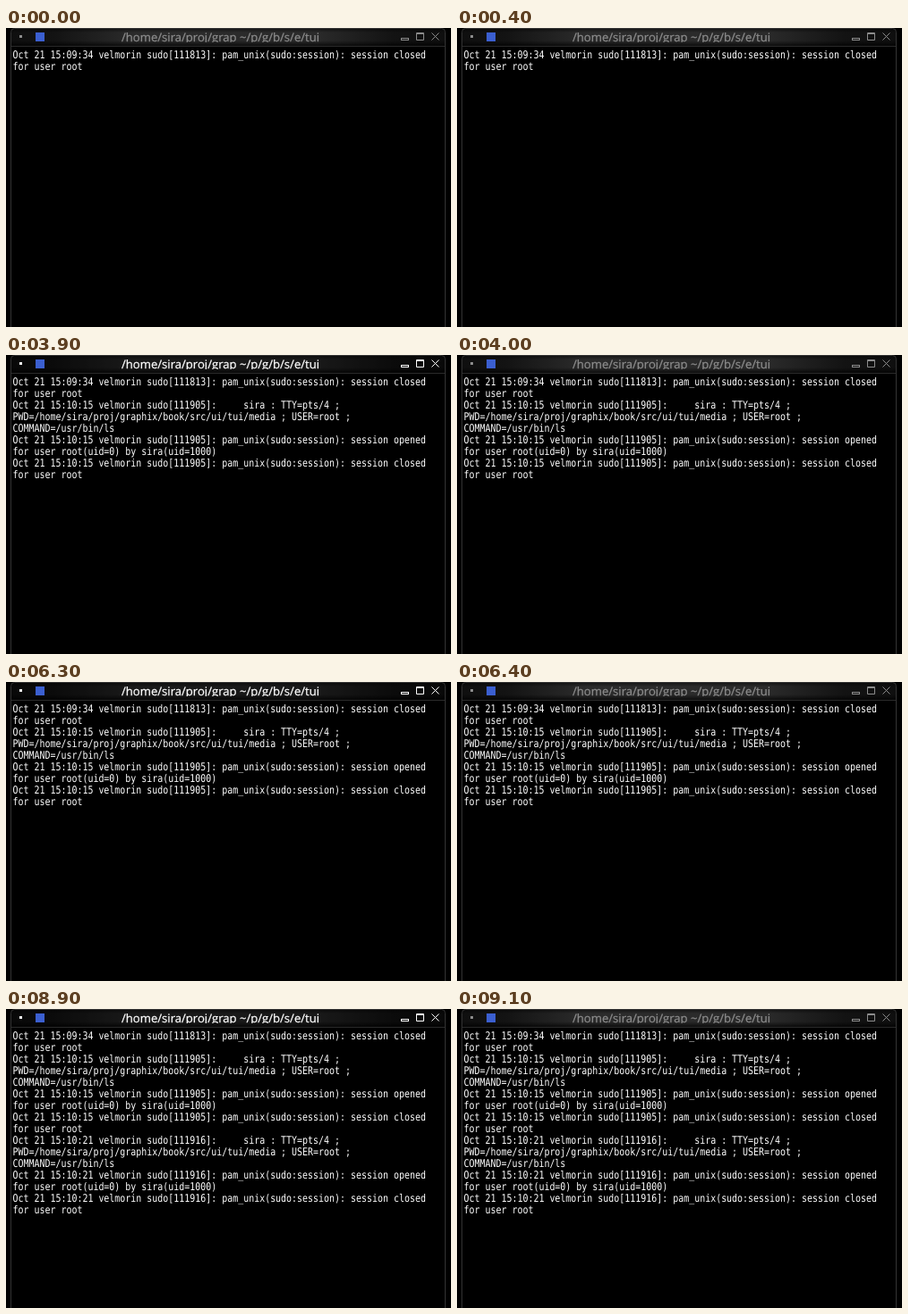
An HTML page that plays this animation: 497 by 335 pixels, repeating every 10 s.

```html
<!DOCTYPE html>
<html lang="en">
<head>
<meta charset="utf-8">
<title>Session log</title>
<style>
  html, body { margin: 0; width: 100%; height: 100%; overflow: hidden; background: #000; }
  svg { display: block; }
  text { white-space: pre; text-rendering: geometricPrecision; }
  .log text { font: 9.966px "DejaVu Sans Mono", "Noto Sans Mono", monospace; fill: #fff; }
  .title {
    font: 13.1px "Open Sans", "Noto Sans", sans-serif;
    fill: currentColor; stroke: currentColor; stroke-width: .25px;
  }
  .bar { color: #8c8c8c; animation: focus 10s step-end infinite; }
  .glow { animation: glow 10s step-end infinite; }
  .late { visibility: hidden; animation: second 10s step-end infinite; }
  .late.last { animation-name: third; }

  @keyframes focus {
    0%, 4%, 40%, 64%, 91%, 100% { color: #8c8c8c; }
    2%, 39%, 63%, 89% { color: #fff; }
  }
  @keyframes glow {
    0%, 4%, 40%, 64%, 91%, 100% { opacity: 1; }
    2%, 39%, 63%, 89% { opacity: .6; }
  }
  @keyframes second { 0% { visibility: hidden; } 21%, 100% { visibility: visible; } }
  @keyframes third { 0% { visibility: hidden; } 83%, 100% { visibility: visible; } }
</style>
</head>
<body>
<svg width="497" height="335" viewBox="0 0 497 335">
  <defs>
    <linearGradient id="sheen">
      <stop offset="0" stop-color="#0f0f0f"/>
      <stop offset=".1" stop-color="#131313"/>
      <stop offset=".28" stop-color="#2b2b2b"/>
      <stop offset=".7" stop-color="#2b2b2b"/>
      <stop offset=".88" stop-color="#131313"/>
      <stop offset="1" stop-color="#0f0f0f"/>
    </linearGradient>
    <linearGradient id="shade" x2="0" y2="1">
      <stop offset="0" stop-opacity=".6"/>
      <stop offset=".25" stop-opacity="0"/>
      <stop offset=".7" stop-opacity="0"/>
      <stop offset="1" stop-opacity=".7"/>
    </linearGradient>
    <clipPath id="strip"><rect x="60" width="370" height="16"/></clipPath>
  </defs>

  <g class="bar">
    <g class="glow">
      <path d="M6 20V4q0-4 4-4H486q4 0 4 4V20z" fill="url(#sheen)"/>
      <path d="M6 20V4q0-4 4-4H486q4 0 4 4V20z" fill="url(#shade)"/>
    </g>
    <rect x="15" y="8" width="3" height="3" fill="currentColor"/>
    <rect x="33" y="5" width="10" height="10" fill="#3b5fd0"/>
    <g clip-path="url(#strip)">
      <text class="title" x="129" y="15">/home/sira/proj/grap ~/p/g/b/s/e/tui</text>
    </g>
    <g fill="none" stroke="currentColor">
      <rect x="441.5" y="11.5" width="8" height="2"/>
      <path d="M458.5 5.5h8v8h-8zM458 6.5h9"/>
      <path d="M475.5 5.5l8 8m0-8l-8 8"/>
    </g>
  </g>

  <path d="M5.5 335V4.5q0-4 4-4H486.5q4 0 4 4V335" fill="none" stroke="#333"/>
  <path d="M6 20.5H490" stroke="#2a2a2a"/>

  <g class="log"></g>
</svg>
<script>
  const NS = "http://www.w3.org/2000/svg";
  const log = document.querySelector(".log");
  const add = (parent, tag, attrs) => {
    const el = document.createElementNS(NS, tag);
    for (const key in attrs) el.setAttribute(key, attrs[key]);
    return parent.appendChild(el);
  };

  let row = 0;
  const print = (lines, cls) => {
    const block = add(log, "g", { class: cls });
    for (const line of lines) {
      const y = 34 + 13 * row++;
      add(block, "text", { transform: `translate(7.5 ${y}) scale(1 1.2)` }).textContent = line;
    }
  };

  const head = (time, pid) => `Oct 21 ${time} velmorin sudo[${pid}]: `;
  const closed = (time, pid) => [
    head(time, pid) + "pam_unix(sudo:session): session closed",
    "for user root",
  ];
  const run = (time, pid) => [
    head(time, pid) + "    sira : TTY=pts/4 ;",
    "PWD=/home/sira/proj/graphix/book/src/ui/tui/media ; USER=root ;",
    "COMMAND=/usr/bin/ls",
    head(time, pid) + "pam_unix(sudo:session): session opened",
    "for user root(uid=0) by sira(uid=1000)",
    ...closed(time, pid),
  ];

  print(closed("15:09:34", 111813), "first");
  print(run("15:10:15", 111905), "late");
  print(run("15:10:21", 111916), "late last");
</script>
</body>
</html>
```
